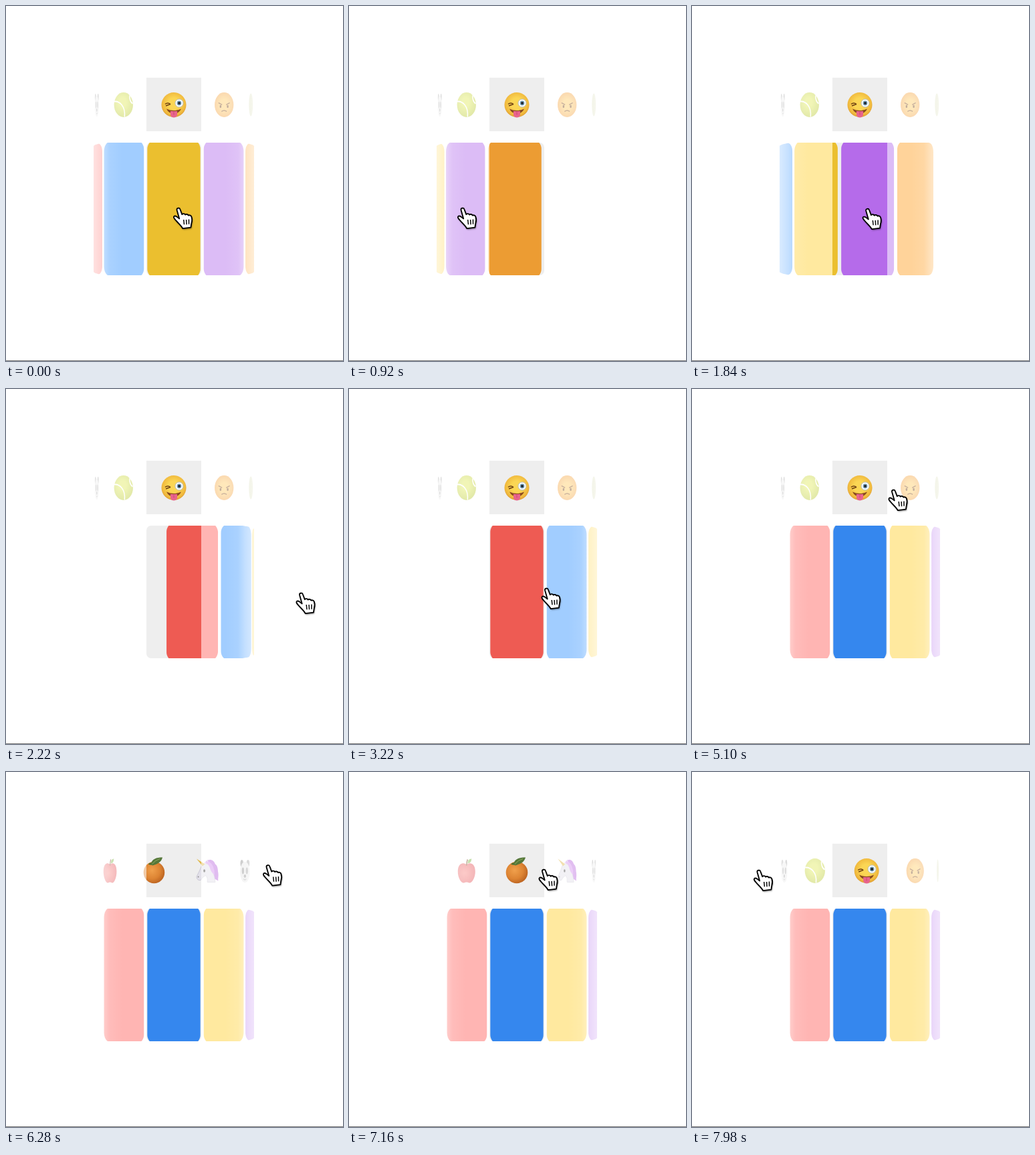
An HTML page for the animation above (8 s loop, 504 px wide and 530 px high).

```html
<!DOCTYPE html>
<html lang="en">
<head>
<meta charset="utf-8">
<title>Wheel pickers</title>
<style>
  html, body { margin: 0; width: 100%; height: 100%; overflow: hidden; background: #fff; }
  svg { display: block; width: 100vw; height: 100vh; }
</style>
</head>
<body>
<svg id="stage" viewBox="0 0 504 530" xmlns="http://www.w3.org/2000/svg">
  <defs>
    <linearGradient id="edge" gradientUnits="userSpaceOnUse" x1="131" x2="371" y1="0" y2="0">
      <stop offset="0" stop-color="#fff" stop-opacity=".6"/>
      <stop offset=".055" stop-color="#fff" stop-opacity=".38"/>
      <stop offset=".1" stop-color="#fff" stop-opacity=".1"/>
      <stop offset=".18" stop-color="#fff" stop-opacity="0"/>
      <stop offset=".82" stop-color="#fff" stop-opacity="0"/>
      <stop offset=".9" stop-color="#fff" stop-opacity=".1"/>
      <stop offset=".945" stop-color="#fff" stop-opacity=".38"/>
      <stop offset="1" stop-color="#fff" stop-opacity=".6"/>
    </linearGradient>
    <radialGradient id="face" cx=".5" cy=".45" r=".55">
      <stop offset=".4" stop-color="#fbd654"/><stop offset=".85" stop-color="#f0b93d"/><stop offset="1" stop-color="#dd9a30"/>
    </radialGradient>
    <radialGradient id="mad" cx=".5" cy=".5" r=".52">
      <stop offset=".4" stop-color="#ffcb62"/><stop offset="1" stop-color="#f5a548"/>
    </radialGradient>
    <radialGradient id="ball" cx=".45" cy=".4" r=".6">
      <stop offset=".3" stop-color="#dfea58"/><stop offset="1" stop-color="#bccc38"/>
    </radialGradient>
    <radialGradient id="peel" cx=".4" cy=".4" r=".65">
      <stop offset="0" stop-color="#f0a04c"/><stop offset=".6" stop-color="#dd8433"/><stop offset="1" stop-color="#b9611f"/>
    </radialGradient>
    <radialGradient id="skin" cx=".4" cy=".5" r=".65">
      <stop offset="0" stop-color="#fb8680"/><stop offset="1" stop-color="#e4545a"/>
    </radialGradient>
    <filter id="soft" x="-30%" y="-30%" width="160%" height="160%"><feGaussianBlur stdDeviation="1"/></filter>
    <clipPath id="clipTop"><rect x="210" y="107" width="82" height="80"/></clipPath>
    <clipPath id="clipLow"><rect x="210" y="204" width="82" height="198"/></clipPath>
    <clipPath id="clipWheel"><rect x="120" y="204" width="262" height="198"/></clipPath>

    <g id="apple">
      <path d="M0-9C4-13 17-13 17 1C17 11 10 19 5 18Q0 16-5 18C-10 19-17 11-17 1C-17-13-4-13 0-9Z" fill="url(#skin)"/>
      <path d="M0-8Q0-13 2-17" fill="none" stroke="#7a4a25" stroke-width="2"/>
      <path d="M2-11Q2-18 10-18Q9-11 2-11Z" fill="#7fb845"/>
    </g>
    <g id="tangerine">
      <circle cy="2.500" r="16.300" fill="url(#peel)"/>
      <path d="M-9-10Q-5-14 0-11Q-4-7-9-10Z" fill="#4c7030"/>
      <path d="M-5-9C-4-18 4-20 13-20C11-12 4-10-2-8Z" fill="#55773a"/>
      <path d="M-3-10Q2-16 9-18" fill="none" stroke="#8fae60"/>
    </g>
    <g id="unicorn">
      <path d="M-3-14C4-19 11-16 13-10C18-7 17-1 18 3C19 8 17 12 18 15L12 12L4-4Z" fill="#b865de"/>
      <path d="M-9-9Q-1-13 5-7Q11 2 13 17H0Q1 10-3 7Q-8 9-11 14Q-17 15-18 9Q-12-1-9-9Z" fill="#e2e0e9" stroke="#c3c0cf" stroke-width=".8"/>
      <path d="M-8-7L-18-18L-4-10Z" fill="#e0b94c"/>
      <path d="M-3-10L0-17L4-9Z" fill="#d5cbe0"/>
      <path d="M-6-12Q1-12 4-5Q6 3 12 6Q12-9 2-14Z" fill="#d18bee"/>
      <ellipse cx="-5" cy="0" rx="1.600" ry="2.200" fill="#333"/>
      <circle cx="-15" cy="9" r="1" fill="#888"/>
    </g>
    <g id="panda">
      <circle cx="-11" cy="-11" r="5.500" fill="#6d6d6d"/><circle cx="11" cy="-11" r="5.500" fill="#6d6d6d"/>
      <ellipse cy="2" rx="17.500" ry="15.500" fill="#dedede"/>
      <ellipse cx="-7" cy="0" rx="4" ry="5" fill="#666"/><ellipse cx="7" cy="0" rx="4" ry="5" fill="#666"/>
      <ellipse cy="8" rx="4" ry="2.400" fill="#555"/>
      <path d="M-5 12Q0 15 5 12" fill="none" stroke="#888" stroke-width="1.500"/>
    </g>
    <g id="tennis">
      <circle r="18.500" fill="url(#ball)"/>
      <path d="M-18-5C-8-6 4 2 2 18M12-14C11-9 14-3 18-2" fill="none" stroke="#fff" stroke-width="2"/>
    </g>
    <g id="wink">
      <circle r="18.500" fill="url(#face)"/>
      <path d="M-13-1Q-9-4-5-1M-12 1.500L-5-1" fill="none" stroke="#6b3d12" stroke-width="1.500"/>
      <circle cx="8" cy="-2.500" r="6" fill="#fff" stroke="#b5bfc0"/>
      <circle cx="8" cy="-2.500" r="3.400" fill="#6f9dbb"/><circle cx="8" cy="-2.500" r="1.900" fill="#222"/>
      <path d="M-11 6Q0 11 11 6Q8 13 0 13Q-8 13-11 6Z" fill="#8a4a20"/>
      <path d="M-5 9.500H5V15Q4 19 0 19Q-4 19-5 15Z" fill="#e8648c"/>
      <path d="M0 10V15" stroke="#c94a72"/>
    </g>
    <g id="angry">
      <circle r="18.500" fill="url(#mad)"/>
      <path d="M-11-3L-4 0M11-3L4 0M-5 10Q0 7 5 10" fill="none" stroke="#8a5220" stroke-width="1.600"/>
      <ellipse cx="-7" cy="2.500" rx="1.700" ry="2.300" fill="#74441c"/><ellipse cx="7" cy="2.500" rx="1.700" ry="2.300" fill="#74441c"/>
    </g>
    <g id="pear"><ellipse rx="17" ry="17" fill="#cdd3a0"/></g>

    <path id="hand" d="M-1 2.500C-1.500-.5 3-1.500 4 1.500L7 9.500C8 8 11 8 12 10C13 8.700 16 9 17 11C18.500 10 21 11 21.500 13C23 17 22.500 20 21.500 23L20.500 29.500L8 31C6 27 1 23-3.500 17.500C-8 13-5 10.500-1 13L2.800 16Z"/>
  </defs>

  <rect width="504" height="530" fill="#fff"/>
  <g id="paleTop" opacity=".43"></g>
  <g clip-path="url(#clipWheel)"><g id="paleLow"></g></g>
  <rect x="120" y="100" width="262" height="310" fill="url(#edge)"/>
  <rect x="210" y="107" width="82" height="80" fill="#eee"/>
  <rect x="210" y="204" width="82" height="198" rx="7" fill="#eee"/>
  <g clip-path="url(#clipTop)"><g id="fullTop"></g></g>
  <g clip-path="url(#clipLow)"><g id="fullLow"></g></g>
  <rect y="529" width="504" height="1" fill="#777"/>
  <g id="cursor">
    <use href="#hand" x="1" y="2" opacity=".45" filter="url(#soft)"/>
    <use href="#hand" fill="#fff" stroke="#000" stroke-width="1.900" stroke-linejoin="round"/>
    <path d="M9.500 17.500L10.300 25M13.500 17.500L14 25M17.500 17L17.600 24.500" stroke="#000" stroke-width="1.500"/>
  </g>
</svg>
<script>
const LOOP = 8000, CENTER = 251, QUARTER = Math.PI / 2;
const rad = deg => deg * Math.PI / 180;
const BAR = { y: 303, radius: 120, step: rad(41.2), half: rad(19.3), height: 104, corner: 14 };
const ICON = { y: 147.5, radius: 117, step: rad(40) };
const $ = id => document.getElementById(id);

const drag = p => p ** 1.2;
const coast = p => 1 - (1 - p) ** 3;
const smooth = p => p * p * (3 - 2 * p);

const bars = [
  ['#ee5b53', '#ffb5b3'], ['#3587ee', '#a1cdff'], ['#ebbf2f', '#ffe99f'],
  ['#b56bea', '#dcbcf6'], ['#ec9c33', '#ffd39a']
];
const emoji = ['apple', 'tangerine', 'unicorn', 'panda', 'tennis', 'wink', 'angry', 'pear'];

// Keys: [time, value, easing into this key]
const barKeys = [
  [0, 2], [40, 2], [400, 3.09, drag], [740, 4.16, coast], [1000, 4, smooth],
  [1690, 4], [2060, .65, drag], [2200, -.345, coast], [2560, 0, smooth],
  [3320, 0], [3640, .7, drag], [4050, 1, coast]
];
const emojiKeys = [
  [0, 5], [5380, 5], [5840, 2.7, drag], [6940, 1, coast],
  [7380, 1], [7580, 3.4, drag], [8280, 5, coast]
];
const handKeys = [
  [0, [256.5, 302]], [40, [256.5, 302]], [400, [168.5, 302], drag], [1690, [168.5, 302]],
  [2060, [440, 305], drag], [2560, [440, 305]], [3150, [294, 298], smooth],
  [3320, [294, 298]], [3640, [237, 299], drag], [4300, [237, 299]],
  [5000, [300, 151], smooth], [5100, [300, 151]], [5330, [206, 150], smooth],
  [5380, [206, 150]], [5840, [390.5, 139.5], drag], [6500, [390.5, 139.5]],
  [6950, [290, 146], smooth], [7380, [290, 146]], [7580, [98.5, 147], drag]
];

function mix(a, b, p) {
  return Array.isArray(a) ? a.map((v, i) => mix(v, b[i], p)) : a + (b - a) * p;
}

function track(keys, t) {
  const i = keys.findIndex(k => k[0] > t);
  if (i < 0) return keys[keys.length - 1][1];
  const [t0, a] = keys[i - 1], [t1, b, ease = smooth] = keys[i];
  return mix(a, b, ease((t - t0) / (t1 - t0)));
}

function add(parent, name, attrs) {
  const el = document.createElementNS('http://www.w3.org/2000/svg', name);
  for (const key in attrs) el.setAttribute(key, attrs[key]);
  return parent.appendChild(el);
}

const bar = (parent, fill) => add(parent, 'path', { fill });
const icon = (parent, name) => add(parent, 'use', { href: '#' + name });

const barNodes = bars.map(([full, pale]) => [bar($('fullLow'), full), bar($('paleLow'), pale)]);
const emojiNodes = emoji.map(name => [icon($('fullTop'), name), icon($('paleTop'), name)]);

// Rounded outline of a bar, as points (angle from its middle, height)
function outline({ radius, half, height, corner }) {
  const upper = [];
  for (let i = 0; i <= 10; i++) {
    const a = QUARTER * i / 10;
    upper.push([half - corner / radius * (1 - Math.cos(a)), -height + corner * (1 - Math.sin(a))]);
  }
  for (let i = 1; i < 10; i++) upper.push([mix(upper[10][0], -upper[10][0], i / 10), -height]);
  upper.push(...upper.slice(0, 11).reverse().map(([u, v]) => [-u, v]));
  return upper.concat(upper.map(([u, v]) => [-u, -v]));
}
const shape = outline(BAR);

// Wraps the outline around the drum; the far side looks a little shorter
function wrap(angle) {
  const points = shape.map(([u, v]) => {
    const a = Math.max(-QUARTER, Math.min(QUARTER, angle + u));
    const x = CENTER + BAR.radius * Math.sin(a);
    const y = BAR.y + v * (.9 + .1 * Math.cos(a));
    return x.toFixed(2) + ' ' + y.toFixed(2);
  });
  return 'M' + points.join('L') + 'Z';
}

function turnBars(pos) {
  barNodes.forEach((nodes, i) => {
    const angle = (i - pos) * BAR.step;
    const d = Math.abs(angle) < QUARTER + BAR.half ? wrap(angle) : '';
    for (const node of nodes) node.setAttribute('d', d);
  });
}

function turnIcons(pos) {
  emojiNodes.forEach((nodes, i) => {
    const angle = (i - pos) * ICON.step;
    const x = CENTER + ICON.radius * Math.sin(angle);
    for (const node of nodes) {
      node.setAttribute('visibility', Math.abs(angle) < QUARTER ? 'visible' : 'hidden');
      node.setAttribute('transform', `translate(${x} ${ICON.y}) scale(${Math.cos(angle)} 1)`);
    }
  });
}

function draw(t) {
  turnBars(track(barKeys, t));
  turnIcons(track(emojiKeys, t));
  const [x, y] = track(handKeys, t);
  $('cursor').setAttribute('transform', `translate(${x} ${y}) scale(.97)`);
}

const start = performance.now();
function frame() {
  draw((performance.now() - start) % LOOP);
  requestAnimationFrame(frame);
}
frame();
</script>
</body>
</html>
```
